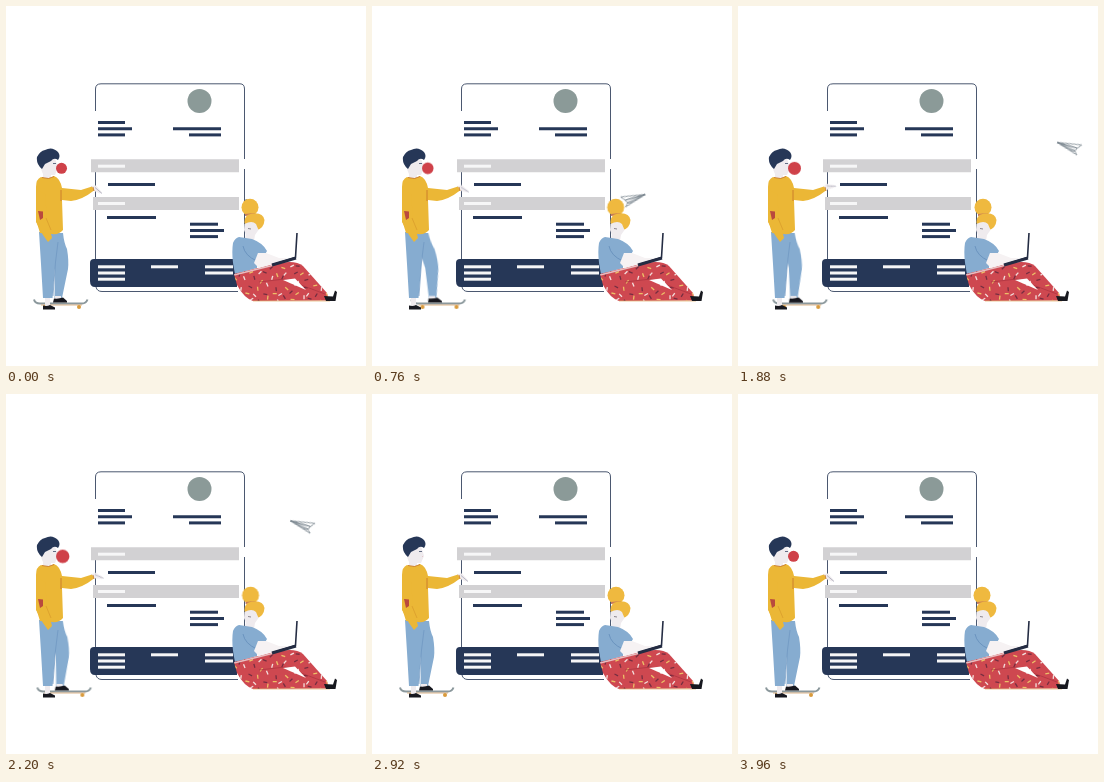
Animation, 360 px wide and 360 px high, one loop 4 s. Source, as an HTML page:

```html
<!DOCTYPE html>
<html lang="en">
<head>
<meta charset="utf-8">
<title>Invoice scene</title>
<style>
  html, body { margin: 0; width: 100%; height: 100%; overflow: hidden; background: #fff; }
  svg { display: block; width: 100vw; height: 100vh; }
  .anim { animation: 4s linear infinite; }
  .navy { fill: #263757; }
  .skin { fill: #efebee; }
  .sweater { fill: #ebb736; }
  .jeans { fill: #86acd0; }
  .hair { fill: #efb93f; }

  #plane { animation-name: fly; }
  #board { animation-name: roll; }
  #leg { animation-name: step; transform-origin: 50px 232px; }
  #hand { animation-name: write; transform-origin: 87px 181px; }
  #bubble { animation-name: blow; transform-origin: 50px 162.5px; }
  #drops { animation-name: burst; transform-origin: 57px 162px; }
  #bun { animation-name: nod; }

  @keyframes fly {
    0%, 12% { transform: translate(230px, 198px) rotate(-20deg) scaleY(1); }
    19% { transform: translate(262px, 192.5px) rotate(-20deg) scaleY(1); }
    33% { transform: translate(306px, 185px) rotate(-20deg) scaleY(1); }
    38% { transform: translate(322px, 176px) rotate(-45deg) scaleY(.8); }
    42.5% { transform: translate(332px, 159px) rotate(-95deg) scaleY(.2); }
    47% { transform: translate(330.5px, 140.5px) rotate(-160deg) scaleY(-1); }
    64% { transform: translate(256.5px, 120px) rotate(-160deg) scaleY(-1); }
    71%, 100% { transform: translate(222px, 116px) rotate(-165deg) scaleY(-1); }
  }
  @keyframes roll {
    0%, 3%, 62%, 100% { transform: translateX(0); }
    19% { transform: translateX(11.5px); }
    33% { transform: translateX(10.8px); }
    47% { transform: translateX(7.2px); }
  }
  @keyframes step {
    0%, 3%, 62%, 100% { transform: skewX(0deg); }
    19%, 33% { transform: skewX(8deg); }
    47% { transform: skewX(3.5deg); }
  }
  @keyframes write {
    0%, 62%, 100% { transform: rotate(0deg); }
    19% { transform: rotate(-8deg); }
    33% { transform: rotate(-18deg); }
    47% { transform: rotate(-40deg); }
  }
  @keyframes blow {
    0%, 33%, 99%, 100% { transform: scale(1); }
    19% { transform: scale(1.05); }
    47% { transform: scale(1.18); }
    61% { transform: scale(1.25); }
    61.01%, 72% { transform: scale(0); }
    83% { transform: scale(.38); }
  }
  @keyframes burst {
    0%, 61% { transform: scale(.4); opacity: 0; }
    61.01% { transform: scale(.6); opacity: 1; }
    64% { transform: scale(1); opacity: 1; }
    69%, 100% { transform: scale(1.4); opacity: 0; }
  }
  @keyframes nod {
    0%, 17%, 64%, 100% { transform: translateX(0); }
    33% { transform: translateX(-2.5px); }
    47% { transform: translateX(1px); }
  }
</style>
</head>
<body>
<svg viewBox="0 0 360 360">
  <defs>
    <clipPath id="trousers">
      <path d="M228 268L268 258Q289 253 297 260L321 287L323 294.5L247 295Q238 292 231 279Z"/>
    </clipPath>
  </defs>

  <g id="plane" class="anim" fill="#fff" stroke="#7d8891" stroke-width=".8" stroke-linejoin="round">
    <path d="M12 0L-12 -6L-9 -1.5ZM12 0L-9 -1.5L-7 3ZM12 0L-11 5L-7 1.5Z"/>
  </g>

  <!-- invoice -->
  <rect x="89" y="77.5" width="149.5" height="208" rx="5" fill="#fff"/>
  <path d="M89.5 105V83Q89.5 77.8 95 77.8H234Q238.5 77.8 238.5 83V153M238.5 163V280M89.5 163V253M90 281Q91 285.5 96 285.5H232" fill="none" stroke="#4b5870"/>
  <circle cx="193.5" cy="95" r="12" fill="#8b9a98"/>
  <path d="M85 153.3H233V166.3H85ZM87 191H233V204H87Z" fill="#d2d1d3"/>
  <path class="navy" d="M88 253H231V281H89Q84 281 84 275V257Q84 253 88 253Z"/>
  <g id="bars" stroke-width="3"></g>

  <!-- man -->
  <g id="board" class="anim">
    <path d="M28 293.5Q29 297.5 34 297.5H76Q80 297.5 81.5 293.5" fill="none" stroke="#8b989c" stroke-width="2"/>
    <path d="M35 299H76" stroke="#d6a36c" stroke-width=".8"/>
    <g fill="#d99a3c"><circle cx="39" cy="301" r="2"/><circle cx="73" cy="301" r="2"/></g>
  </g>
  <g id="leg" class="anim">
    <path class="jeans" d="M42 227H57Q58 237 61 243Q63 255 62 263L56 292H48.5L49 262Z"/>
    <path class="skin" d="M49 290H55V294H49Z"/>
    <path d="M48 292.5Q53 293 57 291.5L61 295V296.5H47Z" fill="#17181f"/>
  </g>
  <path class="jeans" d="M33 226H52L50 250L46.5 292H37L35 258Z"/>
  <path d="M52 236L49.5 256L47 290" fill="none" stroke="#6e96c0" stroke-width=".7"/>
  <path class="skin" d="M39 292H44V300H39Z"/>
  <path d="M37 299.5Q41 300.5 44 299L49 301.5V303.5H37Z" fill="#17181f"/>

  <path class="skin" d="M35 155L48 150L51 158L52 162L49 169L45 169V174H37V168Q34 163 35 155Z"/>
  <path class="navy" d="M36 163Q30 158 31 151Q34 145 39 144Q46 140 52 146Q55 150 52 154Q48 151 45 155L39 158Z"/>
  <path d="M47 157.5H50" stroke="#263757" stroke-width=".7"/>
  <g id="hand" class="anim">
    <path class="skin" d="M85 180L90 179.5L96 186.5L94 187.5L87 184.5Z"/>
    <path d="M89 181.5L96 187.5" stroke="#a9a9b8" stroke-width=".8"/>
  </g>
  <path class="sweater" d="M35 171Q43 174 48 170Q54 172 56 182L75 184L86 180.5L88 184.5Q76 194 65 195L56 194L57 224Q53 229 46 228L34 227L30 214V181Q30 173 35 171Z"/>
  <path class="sweater" d="M31 184L39 188L41 212L46 232L42 236L37 229L30 216Z"/>
  <path d="M36 171.5Q43 174 48 170.5M55 184V195M87 181L88 185" fill="none" stroke="#c97a2b" stroke-width=".9"/>
  <path d="M40 212L45 224" stroke="#d79a2b" stroke-width=".7"/>
  <path d="M32 205L37 205.5V212L34 214Z" fill="#b9493e"/>
  <circle id="bubble" class="anim" cx="55.5" cy="162.3" r="5.5" fill="#cf4149"/>
  <g id="drops" class="anim" fill="#cf4149">
    <circle cx="62" cy="154" r="1"/><circle cx="67" cy="161" r="1"/><circle cx="65" cy="170" r="1"/>
  </g>

  <!-- woman -->
  <g id="bun" class="anim">
    <circle class="hair" cx="244" cy="201.3" r="8.5"/>
    <path d="M239 209L249 208" stroke="#c77a55" stroke-width="1.8"/>
  </g>
  <path class="hair" d="M238.5 217Q238 209 246 207.5Q257 206 258.5 214Q258 222 251 224L243 223Z"/>
  <path class="skin" d="M238.5 218Q246 214 250 218L252.5 224L249 229L248 235H238L240 229L238 224Z"/>
  <path d="M242 222.5L245 223" stroke="#4a4450" stroke-width=".6"/>
  <path class="jeans" d="M233 231L246 233Q257 237 261 245L258 250L252 247L251 262L229 268Q225 250 227 237Q229 232 233 231Z"/>
  <path d="M237 240Q239 250 251 255" fill="none" stroke="#648dba" stroke-width=".8"/>
  <g clip-path="url(#trousers)">
    <path d="M225 250H330V300H225Z" fill="#ce4850"/>
    <g id="print" stroke-width="1.3"></g>
    <path d="M228 269L268 259" stroke="#e8bec0" stroke-width="1.6"/>
    <path d="M253 276L279 273L319 288" fill="none" stroke="#a93340" stroke-width=".7"/>
  </g>
  <path d="M277 274L289 272.5L300 284Z" fill="#fff"/>
  <path d="M247 295H324" stroke="#e0b16b" stroke-width=".7"/>
  <path d="M252 247L260 247L273 252L282 252L270 257L253 262L248 257Z" fill="#f6f2f3"/>
  <path d="M267 258.5L289.5 251.5L291 227" fill="none" stroke="#242c43" stroke-width="1.6"/>
  <path d="M266 259L290 252" stroke="#242c43" stroke-width="3"/>
  <path d="M318 290L327 290.5L329 284.5L331 286L329.5 295H320Z" fill="#17181f"/>
</svg>
<script>
  const add = (id, d, stroke) => {
    const path = document.createElementNS('http://www.w3.org/2000/svg', 'path');
    path.setAttribute('d', d);
    path.setAttribute('stroke', stroke);
    document.getElementById(id).append(path);
  };

  // Text lines of the invoice, stacked downwards from x, y.
  const rows = (x, y, widths, colour) =>
    widths.forEach((w, i) => add('bars', `M${x} ${y + i * 6.2}h${w}`, colour));
  const ink = '#263757', paper = '#f6f6f7';
  rows(92, 116.5, [27, 34, 27], ink);
  rows(167, 122.7, [48], ink);
  rows(183, 128.9, [32], ink);
  rows(92, 160.2, [27], paper);
  rows(102, 178.5, [47], ink);
  rows(92, 197.5, [27], paper);
  rows(101, 211.5, [49], ink);
  rows(184, 218.2, [28, 34, 28], ink);
  rows(92, 260.8, [27, 27, 27], paper);
  rows(145, 260.8, [27], paper);
  rows(199, 260.8, [28, 28], paper);

  // Scattered dashes on the trousers.
  let seed = 7;
  const random = () => (seed = seed * 16807 % 2147483647) / 2147483647;
  const tints = ['#f3dfdd', '#762e40', '#ecc067'];
  for (let row = 0; row < 6; row++) {
    for (let col = 0; col < 11; col++) {
      const x = 229 + col * 9 + row % 2 * 4.5 + random() * 2;
      const y = 260 + row * 6.5 + random() * 2;
      const angle = random() * 2 * Math.PI;
      add('print', `M${x} ${y}l${4 * Math.cos(angle)} ${4 * Math.sin(angle)}`, tints[(row + col) % 3]);
    }
  }
</script>
</body>
</html>
```
